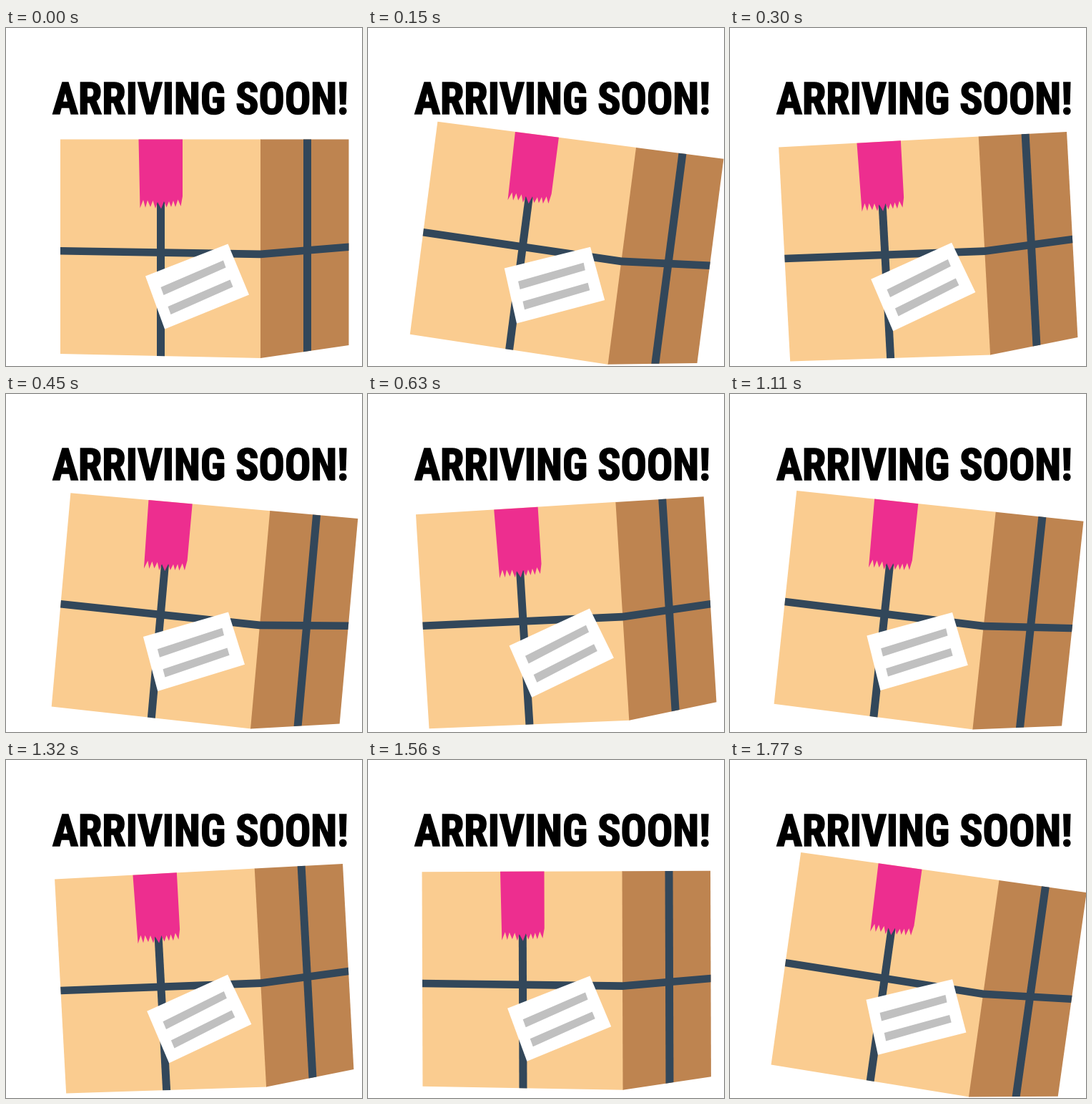
These frames come from a looping animation (498 px wide and 472 px high, 1800 ms). An HTML page:

```html
<!DOCTYPE html>
<html lang="en">
<head>
<meta charset="utf-8">
<title>Arriving soon</title>
<style>
  html, body { margin: 0; width: 100%; height: 100%; overflow: hidden; background: #fff; }
  svg { display: block; width: 498px; height: 472px; }
  #title {
    font: 900 60px "Noto Sans", sans-serif;
    font-stretch: extra-condensed;
    stroke: #000;
    stroke-width: 1.6px;
  }
  .strap { fill: #32475a; }
  .bar { fill: #c0c0c0; }
</style>
</head>
<body>
<svg viewBox="0 0 498 472">
  <text id="title" x="65" y="119.5">ARRIVING SOON!</text>
  <g id="box">
    <path fill="#facc90" d="M76 155.5H357V461L76 455Z"/>
    <path fill="#be8450" d="M356 155.5H479.5V443L356 461Z"/>
    <path class="strap" d="M211 200H222V458.2L211 458Z"/>
    <path class="strap" d="M416 155.5H427V450.6L416 452.2Z"/>
    <path class="strap" d="M76 306L356 310.5L479.5 300.5V311L356 321.3L76 316.5Z"/>
    <path fill="#ed2e8f" d="M185.5 155.5H247V235L244.5 249L240.5 239.5L237 250L234 241L231 250
      L228 242L224.500 250.500L221 242L217 252.500L212 243L209 252L205.500 241L202 250L198 240.500
      L195 251L192 240L187.500 251.500Z"/>
    <path fill="#fff" d="M195 346.500L310.500 301.500L340 372.500L222 420.500Z"/>
    <path class="bar" d="M216.500 362L304 324.500L307.500 334.500L220.500 373Z"/>
    <path class="bar" d="M226.500 389L313.500 351.500L317.500 361.500L230.500 400Z"/>
  </g>
</svg>
<script>
  const title = document.getElementById('title');
  const box = document.getElementById('box');

  // Use the narrowest heavy face available, sized to the headline's width.
  const families = ['Impact', 'Noto Sans', 'Open Sans', 'Roboto', 'Roboto Condensed', 'Liberation Sans Narrow'];
  const setFamily = name => { title.style.fontFamily = `"${name}", "Noto Sans", sans-serif`; };
  const measured = families.map(name => {
    setFamily(name);
    return { name, width: title.getComputedTextLength() };
  });
  const best = measured.reduce((a, b) => (b.width < a.width ? b : a));
  setFamily(best.name);
  title.style.fontSize = `${60 * 414 / best.width}px`;

  const LOOP = 1800, STEP = 30;
  const SWING = 5.4;               // steps per swing
  const LAST = LOOP / STEP - 1;
  const RIGHT = 8, LEFT = -5;      // degrees

  const pose = i => (i === 0 ? 0 : i % 2 ? RIGHT : LEFT);

  function angle(step) {
    const i = Math.floor(step / SWING + 1e-6);
    const start = i * SWING;
    const end = Math.min(start + SWING, LAST);
    const k = end > start ? (step - start) / (end - start) : 1;
    return pose(i) + (pose(i + 1) - pose(i)) * k;
  }

  const begin = performance.now();
  function draw() {
    const t = Math.max(0, performance.now() - begin) % LOOP;
    const step = Math.min(LAST, Math.floor((t + 0.5) / STEP));
    box.setAttribute('transform', `rotate(${angle(step).toFixed(3)} 277.5 308)`);
    requestAnimationFrame(draw);
  }
  draw();
</script>
</body>
</html>
```
